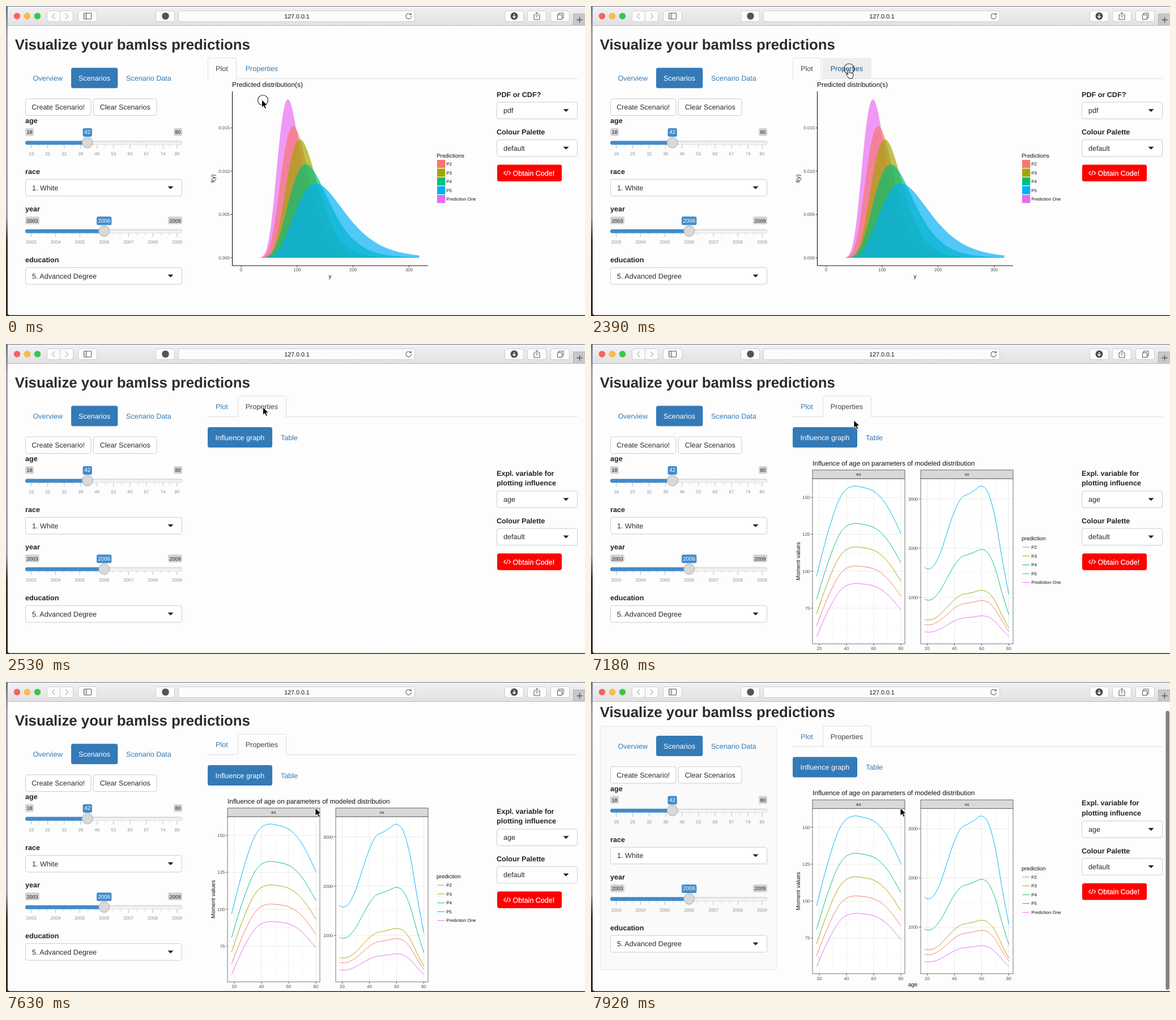
Animation, 1022 px wide and 548 px high, one loop 8000 ms. Source, as an HTML page:

```html
<!DOCTYPE html>
<html lang="en">
<head>
<meta charset="utf-8">
<title>Visualize your bamlss predictions</title>
<style>
  html, body { margin: 0; width: 100%; height: 100%; overflow: hidden; background: #fdfdfd; }
  svg { display: block; width: 1022px; height: 548px; }
  text { font-family: "Liberation Sans", Arial, sans-serif; text-rendering: geometricPrecision; white-space: pre; }
</style>
</head>
<body>
<svg id="stage" viewBox="0 0 1022 548" xmlns="http://www.w3.org/2000/svg"></svg>
<script>
const LOOP = 8000;
const BLUE = '#337ab7', BODY = '#2b2b2b', DARK = '#222';
const SERIES = [
  { name: 'P2', color: '#f8766d', mode: 93, sigma: 0.2718, ex: 0.657, vx: 0.286 },
  { name: 'P3', color: '#a3a500', mode: 105, sigma: 0.268, ex: 0.739, vx: 0.349 },
  { name: 'P4', color: '#00bf7d', mode: 115.5, sigma: 0.3055, ex: 0.84, vx: 0.604 },
  { name: 'P5', color: '#00b0f6', mode: 133.5, sigma: 0.33, ex: 1, vx: 1 },
  { name: 'Prediction One', color: '#e76bf3', mode: 83.5, sigma: 0.2528, ex: 0.582, vx: 0.191 }
];

// Markup helpers
const el = (tag, attrs, body = '') =>
  `<${tag} ${Object.entries(attrs).map(([k, v]) => `${k}="${v}"`).join(' ')}>${body}</${tag}>`;
const rect = (x, y, width, height, fill, more = {}) => el('rect', { x, y, width, height, fill, ...more });
const line = (x1, y1, x2, y2, stroke, width = 1) =>
  el('line', { x1, y1, x2, y2, stroke, 'stroke-width': width });
const circle = (cx, cy, r, fill, more = {}) => el('circle', { cx, cy, r, fill, ...more });
const path = (d, stroke, width = 1, more = {}) =>
  el('path', { d, fill: 'none', stroke, 'stroke-width': width, ...more });
const text = (s, x, y, size = 12.6, fill = BODY, more = {}) =>
  el('text', { x, y, 'font-size': size, fill, ...more }, s.replace(/</g, '&lt;').replace(/>/g, '&gt;'));
const mid = { 'text-anchor': 'middle' }, end = { 'text-anchor': 'end' }, bold = { 'font-weight': 'bold' };
const group = (id, body, more = {}) => el('g', { id, ...more }, body);
const label = (s, x, y) => text(s, x, y, 12.6, DARK, bold);
const box = (x, y, w, h) => rect(x + .5, y + .5, w - 1, h - 1, '#fff', { stroke: '#ccc', rx: 3.6 });
const pill = (x, y, w, h) => rect(x, y, w, h, BLUE, { rx: 3.6 });
const range = (n, f) => Array.from({ length: n }, (_, i) => f(i)).join('');

function select(s, x, y, w) {
  const cx = x + w - 20.5, cy = y + 12.8;
  return box(x, y, w, 30.5) + text(s, x + 12, y + 19.7) +
    `<path d="M${cx - 5} ${cy}h10l-5 5Z" fill="#222"/>`;
}

function slider(y, min, value, max, valueX, ticks, smallPerGap) {
  const left = 44.5, right = 302;
  const badge = (s, x, w, h, fill, color, size) =>
    rect(x, y - 25, w, h, fill, { rx: 2.7 }) + text(s, x + w / 2, y - 14.7, size, color, mid);
  const limitWidth = 5 + 5 * min.length, valueWidth = limitWidth + 1.3;
  const at = v => left + (v - ticks[0]) / (ticks[ticks.length - 1] - ticks[0]) * (right - left);
  let marks = '';
  ticks.forEach((v, i) => {
    const x = at(v), gap = i + 1 < ticks.length ? (at(ticks[i + 1]) - x) / (smallPerGap + 1) : 0;
    marks += line(x, y + 4.5, x, y + 11, '#9cc3e2') + text(String(v), x, y + 23, 8.1, '#8c9197', mid);
    if (gap) marks += range(smallPerGap, k => line(x + gap * (k + 1), y + 4.5, x + gap * (k + 1), y + 8, '#c3d5e3'));
  });
  return badge(min, 34, limitWidth, 13.5, '#d2d2d2', '#222', 9) +
    badge(max, 311 - limitWidth, limitWidth, 13.5, '#d2d2d2', '#222', 9) +
    badge(value, valueX - valueWidth / 2, valueWidth, 15, '#428bca', '#fff', 9.9) + marks +
    rect(34.5, y - 2.2, 276.5, 6, 'url(#track)', { stroke: '#d0d0d0', 'stroke-width': .9, rx: 3 }) +
    rect(34, y - 2.6, valueX - 34, 6.8, '#428bca', { rx: 3 }) +
    circle(valueX, y + .5, 9.5, '#d9d9d9', { stroke: '#aaa' });
}

function chrome() {
  const button = (x, w) => rect(x + .5, 8.5, w - 1, 19, '#fcfcfc', { stroke: '#cfcdcf', rx: 3.5 });
  const ink = '#555';
  return rect(3, 1, 1019, 33.5, 'url(#bar)') + line(3, 34.5, 1022, 34.5, '#bdbbbd') +
    [['#fc605b', 19.5], ['#fdbc40', 37.5], ['#34c84a', 55.5]]
      .map(([c, x]) => circle(x, 17.8, 5.6, c, { stroke: '#0002', 'stroke-width': .6 })).join('') +
    button(72, 24) + button(95, 24) + button(127, 34) + button(264, 34) + button(304, 418) +
    button(880, 34) + button(920, 34) + button(961, 34) +
    path('M86 13l-4.5 5l4.5 5M105 13l4.5 5l-4.5 5', '#b8b8b8', 1.2) +
    path('M137.5 12.5h13v10.5h-13ZM142 12.5v10.5M139 15h1.5M139 17.5h1.5M139 20h1.5', ink) +
    circle(281.5, 17.8, 6.3, '#555') +
    text('127.0.0.1', 513.5, 22, 10.7, '#111', mid) +
    path('M714.6 15.2a4.8 4.8 0 1 0 .9 2.8M715.3 12v3.5h-3.5', '#666', 1.1) +
    circle(897, 17.8, 6.5, '#4c4c4c') + path('M897 14v6.5M894.3 18l2.7 2.9l2.7-2.9', '#fff', 1.4) +
    path('M934.5 15.5h-2.5v8.5h10v-8.5h-2.5M937 20.5v-9M934.5 13.7l2.5-2.5l2.5 2.5', ink) +
    path('M973.5 15.5h8v8h-8ZM975.5 15.5v-3h8.5v8.5h-2.5', ink) +
    rect(1001, 14, 21, 20.5, '#c9c7c9') + path('M1001.5 34v-20h21', '#b1afb1') +
    path('M1007.5 24.5h10M1012.5 19.5v10', '#555', 1.3);
}

function sidebar() {
  return group('well', rect(16.5, 92.5, 312, 430.5, '#fafafa', { stroke: '#e8e8e8', rx: 3.6 })) +
    text('Overview', 47.5, 132, 12.6, BLUE) + pill(115, 109.3, 82.3, 36) +
    text('Scenarios', 128, 132, 12.6, '#fff') + text('Scenario Data', 212, 132, 12.6, BLUE) +
    box(34, 163.5, 116.5, 30.5) + text('Create Scenario!', 92.2, 183, 12.5, BODY, mid) +
    box(154, 163.5, 112.5, 30.5) + text('Clear Scenarios', 210.2, 183, 12.5, BODY, mid) +
    label('age', 34, 207) +
    slider(241, '18', '42', '80', 143.7, [18, 25, 32, 39, 46, 53, 60, 67, 74, 80], 1) +
    label('race', 34, 297) + select('1. White', 34, 306, 277) +
    label('year', 34, 363) +
    slider(397.3, '2003', '2006', '2009', 173.2, [2003, 2004, 2005, 2006, 2007, 2008, 2009], 2) +
    label('education', 34, 453) + select('5. Advanced Degree', 34, 462, 277);
}

function palette(dy) {
  return `<g transform="translate(0 ${dy})">` + label('Colour Palette', 866, 227.3) +
    select('default', 866, 236, 143) + rect(867, 280.5, 114, 29.5, '#f00', { rx: 3.6 }) +
    path('M882 292l-3.2 3.3l3.2 3.3M887.3 292l3.2 3.3l-3.2 3.3M885.8 291l-2.3 8.6', '#fff', 1.2) +
    text('Obtain Code!', 894.5, 300, 12.5, '#fff', { stroke: '#fff', 'stroke-width': .25 }) + '</g>';
}

function densityPlot() {
  const px = v => 415 + v * 0.9885, py = d => 445 - d * 15300;
  const density = (s, v) => {
    const z = (Math.log(v / s.mode) - s.sigma ** 2) / s.sigma;
    return Math.exp(-z * z / 2) / (v * s.sigma * Math.sqrt(2 * Math.PI));
  };
  const area = s => {
    let d = `M${px(30)} ${py(0)}`;
    for (let v = 30; v <= 318; v += 1.5) d += `L${px(v).toFixed(2)} ${py(density(s, v)).toFixed(2)}`;
    return el('path', { d: d + `V${py(0)}Z`, fill: s.color, 'fill-opacity': .68 });
  };
  const ordered = [SERIES[4], ...SERIES.slice(0, 4)];
  return text('Predicted distribution(s)', 399, 142.5, 11.9, '#111') + ordered.map(area).join('') +
    path('M399.5 151V459H745', '#111', 1.1) +
    range(4, i => {
      const y = py(i * .005), x = px(i * 100);
      return line(396.5, y, 399, y, '#333') + text((i * .005).toFixed(3), 395, y + 2.8, 7.9, '#4d4d4d', end) +
        line(x, 459.5, x, 462, '#333') + text(String(i * 100), x, 469.3, 7.9, '#4d4d4d', mid);
    }) +
    text('y', 572, 481, 10, '#111', mid) +
    text('f(y)', 0, 0, 10, '#111', { ...mid, transform: 'translate(368.5 305) rotate(-90)' }) +
    text('Predictions', 760, 268, 9.9, '#111') +
    SERIES.map((s, i) => rect(761, 272 + i * 15.5, 14.3, 14.3, s.color) +
      text(s.name, 777.3, 282.3 + i * 15.5, 7.9, '#111')).join('');
}

function smooth(pts) {
  const f = n => n.toFixed(2);
  let d = `M${pts[0].map(f)}`;
  for (let i = 0; i + 1 < pts.length; i++) {
    const [b, c] = [pts[i], pts[i + 1]], a = pts[i - 1] || b, e = pts[i + 2] || c;
    const tangent = (p, q) => (q[1] - p[1]) / (q[0] - p[0]), h = (c[0] - b[0]) / 3;
    d += `C${f(b[0] + h)} ${f(b[1] + h * tangent(a, c))} ${f(c[0] - h)} ${f(c[1] - h * tangent(b, e))} ${c.map(f)}`;
  }
  return d;
}

function influencePlot() {
  const panel = (key, x0, firstTick, labels, py, minors, curve) => {
    const ages = [20, 40, 60, 80], grid = '#e9e9e9';
    const ax = age => firstTick + (age - 20) * 2.4;
    const row = (v, w) => line(x0, py(v), x0 + 163, py(v), grid, w);
    const col = (age, w) => line(ax(age), 238, ax(age), 530, grid, w);
    const ratio = (s, age) => s[key] * (1 + .025 * (1 - s[key]) * (age - 49) / 31);
    return rect(x0, 238, 163, 292, '#fff') +
      minors.map(v => row(v, .4)).join('') + [30, 50, 70].map(a => col(a, .4)).join('') +
      labels.map(v => row(v, .9)).join('') + ages.map(a => col(a, .9)).join('') +
      SERIES.map(s => path(smooth(curve.map(([age, v]) => [ax(age), py(v * ratio(s, age))])), s.color, .95)).join('') +
      rect(x0, 238, 163, 292, 'none', { stroke: '#777' }) +
      rect(x0, 222.8, 163, 15.2, '#d9d9d9', { stroke: '#666' }) +
      text(key, x0 + 81.5, 233, 7.9, '#1a1a1a', mid) +
      labels.map(v => line(x0 - 3, py(v), x0, py(v), '#555') +
        text(String(v), x0 - 4.5, py(v) + 2.8, 7.9, '#4d4d4d', end)).join('') +
      ages.map(a => line(ax(a), 530, ax(a), 533, '#555') +
        text(String(a), ax(a), 541, 7.9, '#4d4d4d', mid)).join('');
  };
  const means = [[18, 96.7], [24, 118.5], [30, 137.3], [35, 149.3], [40, 155.6], [46, 157.7], [50, 157.2],
    [55, 156.1], [60, 154.2], [65, 150.2], [70, 144], [75, 135.4], [80, 125.5]];
  const variances = [[18, 1610], [21, 1575], [25, 1650], [30, 1930], [35, 2350], [40, 2750], [45, 3015], [50, 3095],
    [55, 3180], [60, 3258], [65, 3110], [70, 2610], [75, 1800], [80, 1060]];
  return text('Influence of age on parameters of modeled distribution', 391, 214.5, 11.85, '#111') +
    panel('ex', 391, 403, [75, 100, 125, 150], v => 401.7 - (v - 100) * 2.61, [62.5, 87.5, 112.5, 137.5, 162.5], means) +
    panel('vx', 582, 593.5, [1000, 2000, 3000], v => 448 - (v - 1000) * .0871, [500, 1500, 2500], variances) +
    text('Moment values', 0, 0, 10, '#111', { ...mid, transform: 'translate(368.8 384) rotate(-90)' }) +
    text('age', 568, 552, 10, '#111', mid) + text('prediction', 760, 347, 9.8, '#111') +
    SERIES.map((s, i) => line(761.5, 359.2 + i * 15.6, 774, 359.2 + i * 15.6, s.color, 1) +
      text(s.name, 777.3, 362 + i * 15.6, 7.9, '#111')).join('');
}

function tabs() {
  const active = (id, x, w) => group(id, rect(x, 128, w, 1.2, '#fdfdfd') +
    path(`M${x + .5} 129V95.5q0-3.5 3.5-3.5h${w - 8}q3.5 0 3.5 3.5V129`, '#ddd'));
  return line(356, 128.5, 1009, 128.5, '#ddd') +
    group('hover', rect(409, 92, 86, 36.5, '#eee', { rx: 3.6 })) +
    active('tabPlot', 356, 51) + active('tabProps', 409, 86) +
    text('Plot', 370, 115, 12.6, BODY, { id: 'plotText' }) +
    text('Properties', 422.7, 115, 12.6, BLUE, { id: 'propsText' });
}

const defs = `<defs>
  <linearGradient id="bar" x2="0" y2="1"><stop stop-color="#f2f1f2"/><stop offset="1" stop-color="#e2e0e2"/></linearGradient>
  <linearGradient id="track" x2="0" y2="1"><stop stop-color="#e2e2e2"/><stop offset="1" stop-color="#fff"/></linearGradient>
  <linearGradient id="desk" x2="0" y2="1"><stop stop-color="#6b7086"/><stop offset=".1" stop-color="#a3a5b0"/><stop offset=".68" stop-color="#9c9ca4"/><stop offset=".76" stop-color="#3a302e"/><stop offset="1" stop-color="#33241f"/></linearGradient>
  <clipPath id="view"><rect x="3" y="35" width="1019" height="511"/></clipPath>
</defs>`;

const stage = document.getElementById('stage');
stage.innerHTML = defs + rect(0, 0, 1022, 548, 'url(#desk)') +
  rect(3, 1, 1030, 545.5, '#fdfdfd', { rx: 4 }) +
  el('g', { 'clip-path': 'url(#view)' }, group('page',
    text('Visualize your bamlss predictions', 15.7, 76.7, 25.8, BODY, bold) + sidebar() + tabs() +
    group('plotPane', densityPlot() + label('PDF or CDF?', 866, 160.7) + select('pdf', 866, 169.5, 143) + palette(0)) +
    group('propsPane', pill(356, 147, 114, 36) + text('Influence graph', 369.5, 169.5, 12.6, '#fff') +
      text('Table', 485, 169.5, 12.6, BLUE) + label('Expl. variable for', 866, 232.5) +
      label('plotting influence', 866, 250) + select('age', 866, 259.5, 143) + palette(89.7)) +
    group('chart', influencePlot()))) +
  chrome() + group('scrollbar', rect(1014.5, 51, 6.5, 493, '#808080', { rx: 3.2 })) +
  group('ring', circle(0, 0, 9, 'none', { stroke: DARK, 'stroke-width': 1.1 })) +
  group('arrow', path('M.5 .7V14.6L3.7 11.6L6 16.6L8.4 15.5L6.2 10.7H10.6Z', '#fff', .9, { fill: '#000' })) +
  group('hand', path('M4 9V2.2a1.4 1.4 0 0 1 2.8 0V6.5a1.3 1.3 0 0 1 2.4 .3a1.2 1.2 0 0 1 2.2 .5a1.1 1.1 0 0 1 1.9 .8V11c0 2-1.3 2.8-1.3 5H5.6C5 13.6 2.5 12 1.3 9.8c-.9-1.6 .8-2.6 2.7-.8Z', '#111', 1, { fill: '#fff' }));

// Pointer stops: start time, shape, x, y
const POINTER = [
  [0, 'arrow', 451, 165], [150, 'arrow', 450.5, 161], [300, 'arrow', 450.5, 155], [450, 'arrow', 451, 153],
  [600, 'arrow', 451.5, 151], [750, 'arrow', 451.5, 149], [900, 'arrow', 452.5, 144], [1040, 'arrow', 453, 135],
  [1190, 'hand', 451, 127], [1340, 'hand', 450.5, 115], [1490, 'hand', 449.5, 112], [2530, 'arrow', 453, 111],
  [7180, 'arrow', 463.5, 134], [7330, 'arrow', 512, 200], [7480, 'arrow', 544.5, 224], [7630, 'arrow', 545.5, 222]
];

const node = id => document.getElementById(id);
const show = (id, on) => node(id).setAttribute('visibility', on ? 'visible' : 'hidden');
const move = (id, x, y) => node(id).setAttribute('transform', `translate(${x} ${y})`);

function render(t) {
  const props = t >= 2530, scrolled = t >= 7770;
  const [, shape, x, y] = POINTER.filter(p => p[0] <= t).pop();
  for (const id of ['arrow', 'hand']) show(id, id === shape);
  move(shape, x, y);
  const firstClick = t < 150;
  show('ring', firstClick || (t >= 2390 && !props));
  move('ring', firstClick ? 453.5 : 455.5, firstClick ? 166.5 : 111);
  show('hover', t >= 1190 && !props);
  show('tabPlot', !props);
  show('tabProps', props);
  show('plotPane', !props);
  show('propsPane', props);
  show('chart', t >= 3280);
  show('well', scrolled);
  show('scrollbar', t >= 7920);
  node('plotText').setAttribute('fill', props ? BLUE : '#444');
  node('propsText').setAttribute('fill', props ? '#444' : t >= 1190 ? '#23527c' : BLUE);
  move('page', 0, t >= 7920 ? -14.4 : scrolled ? -4.5 : 0);
}

const start = performance.now();
function tick() {
  render((performance.now() - start) % LOOP);
  requestAnimationFrame(tick);
}
tick();
</script>
</body>
</html>
```
